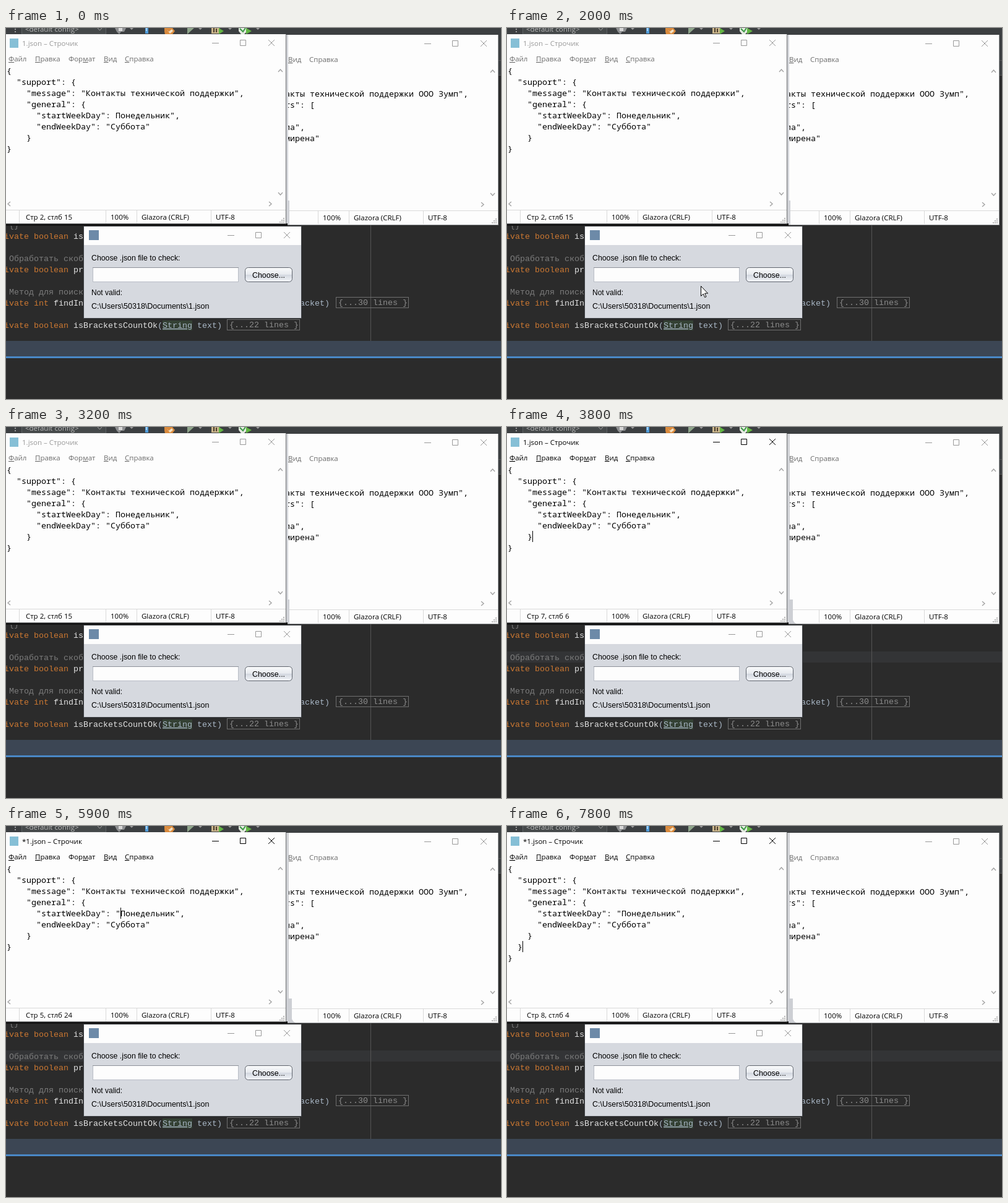
These frames come from a looping animation (800x600 px, 8 s). An HTML page:

```html
<!DOCTYPE html>
<html lang="ru">
<head>
<meta charset="utf-8">
<title>JSON check</title>
<style>
html, body { margin: 0; width: 100%; height: 100%; overflow: hidden; background: #2b2b2b; }
svg { display: block; }
text { white-space: pre; }
.ui { font: 11.5px "Open Sans", "Noto Sans", sans-serif; }
.note { font: 13.33px "Noto Sans Mono", monospace; fill: #000; }
.code { font: 13.33px "Liberation Mono", monospace; fill: #a9b7c6; }
.swing { font-family: "Liberation Sans", sans-serif; fill: #000; }
.kw { fill: #cc7832; }
.fn { fill: #e2e2e2; }
.rem { fill: #7c7c7c; }
.u { text-decoration: underline; }
.title { fill: #999; }
.menu { fill: #6d6d6d; }
.ctl { stroke: #999; fill: none; }
.active .title, .active .menu { fill: #000; }
.active .ctl { stroke: #000; }
</style>
</head>
<body>
<svg id="stage" width="800" height="600" viewBox="0 0 800 600"></svg>
<script>
const LOOP = 8000, CHAR = 8, ROW = 18;
const stage = document.getElementById('stage');

function add(parent, tag, attrs = {}, content) {
  const el = document.createElementNS('http://www.w3.org/2000/svg', tag);
  for (const k in attrs) el.setAttribute(k, attrs[k]);
  if (content !== undefined) el.textContent = content;
  return parent.appendChild(el);
}
const rect = (p, x, y, width, height, fill, more) =>
  add(p, 'rect', { x, y, width, height, fill, ...more });
const path = (p, d, stroke, more) => add(p, 'path', { d, stroke, fill: 'none', ...more });
const shape = (p, d, fill) => add(p, 'path', { d, fill });
const text = (p, cls, x, y, s, more) => add(p, 'text', { class: cls, x, y, ...more }, s);
const show = (el, on) => el.setAttribute('visibility', on ? 'visible' : 'hidden');

// Text made of [class, string] runs
function runs(p, cls, x, y, parts) {
  const t = text(p, cls, x, y, '');
  for (const [c, s] of parts) add(t, 'tspan', { class: c }, s);
}

function controls(p, x, y) {
  add(p, 'path', {
    d: `M${x - 5} ${y + .5}h11 M${x + 40.5} ${y - 4.5}h9v9h-9z M${x + 86} ${y - 5}l10 10m0 -10l-10 10`,
    class: 'ctl'
  });
}

function drawEditor() {
  rect(stage, 0, 0, 800, 600, '#2b2b2b');
  const hl = rect(stage, 0, 363, 800, 18, '#333436');
  rect(stage, 589, 319, 1, 187, '#555');

  const code = (y, ...parts) => runs(stage, 'code', -3, y, parts);
  const fold = (x, y, lines) => {
    rect(stage, x + .5, y + .5, 117, 17, 'none', { stroke: '#6f6f6f' });
    text(stage, 'code', x + 4, y + 13, `{...${lines} lines }`, { style: 'fill:#8c8c8c' });
  };
  code(323, ['rem', ' {}"']);
  code(341, ['kw', 'ivate boolean '], ['fn', 'is']);
  code(377, ['rem', ' Обработать скобки']);
  code(395, ['kw', 'ivate boolean '], ['fn', 'pr']);
  code(431, ['rem', ' Метод для поиска']);
  code(449, ['kw', 'ivate int '], ['fn', 'findIn']);
  text(stage, 'code', 475, 449, 'acket)');
  fold(533, 435, 30);
  rect(stage, 253, 473, 48, 16, '#344134');
  code(485, ['kw', 'ivate boolean '], ['fn', 'isBracketsCountOk'], ['', '('], ['u', 'String'], ['', ' text)']);
  fold(357, 471, 22);

  rect(stage, 0, 506, 800, 25, '#3c4654');
  rect(stage, 0, 531, 800, 3, '#4a88c7');
  return hl;
}

function drawToolbar() {
  rect(stage, 0, 0, 800, 12, '#3c3f41');
  rect(stage, 795, 12, 5, 65, '#3c3f41');
  rect(stage, 796, 52, 4, 1, '#555');
  rect(stage, 795, 76, 5, 1, '#555');
  rect(stage, 14, 1, 2, 2, '#999');
  rect(stage, 14, 5, 2, 2, '#999');
  rect(stage, 25.5, -8, 136, 18, '#45494a', { stroke: '#5e6264' });
  text(stage, 'ui', 31, 6, '<default config>', { fill: '#bbb' });
  path(stage, 'M148 0l3.5 4l3.5 -4', '#a0a0a0');
  shape(stage, 'M176 0h18l-3 6h-5l-3 4l-4 -4z', '#8d8f91');
  rect(stage, 182, 0, 6, 5, '#d6d6d6');
  rect(stage, 225, 0, 5, 9, '#4f9bd9');
  rect(stage, 226, 0, 2, 5, '#a9d5f5');
  shape(stage, 'M256 0h13l4 5l-4 5h-12l-1 -4z', '#d98a3d');
  shape(stage, 'M259 2l4 4l5 -4l2 3l-5 4z', '#f2e0c4');
  shape(stage, 'M293 0h11l-11 10z', '#8fa58b');
  rect(stage, 332, 0, 13, 9, '#c9b48a');
  rect(stage, 335, 0, 2, 7, '#4d4030');
  rect(stage, 339, 1, 2, 6, '#4d4030');
  shape(stage, 'M344 0l8 5l-8 5z', '#62b543');
  shape(stage, 'M376 0h13v6l-4 4h-5l-4 -5z', '#e4e9e0');
  path(stage, 'M378 1l5 5l4 -6', '#3b9a45', { 'stroke-width': 2 });
  shape(stage, 'M388 0l9 5l-9 5z', '#62b543');
  for (const x of [203, 314, 362, 407]) shape(stage, `M${x - 3} 0h6l-3 3z`, '#999');
}

// Frame parts shared by both text panes
function drawFrame(g, dx, dy) {
  const f = add(g, 'g', { transform: `translate(${dx} ${dy})` });
  controls(f, 338, 24);
  path(f, 'M440 71l3.5 -4l3.5 4 M440 266l3.5 4l3.5 -4 M425 281l4 3.5l-4 3.5', '#a0a0a0', { 'stroke-width': 1.3 });
  rect(f, 0, 294, 452, 1, '#d9d9d9');
  for (const x of [161, 211, 331]) rect(f, x, 295, 1, 21, '#d9d9d9');
  [[169, '100%'], [219, 'Glazora (CRLF)'], [339, 'UTF-8']].forEach(([x, s]) => text(f, 'ui', x, 310, s));
  for (let i = 0; i < 3; i++)
    for (let j = 0; j <= i; j++) rect(f, 448 - j * 3, 307 + i * 3, 2, 2, '#b5b5b5');
}

function drawMenu(g, dx, y, items) {
  for (const [x, a, key, b] of items)
    runs(g, 'ui menu', x + dx, y, [['', a], ['u', key], ['', b]]);
}
const VIEW = [[158, '', 'В', 'ид'], [192, '', 'С', 'правка']];

function drawBackPane() {
  const g = add(stage, 'g');
  rect(g, 452, 11, 344, 308, '#8a8c8e');
  rect(g, 452, 11, 343, 307, '#fdfdfd');
  drawMenu(g, 298, 55, [VIEW[0], [192, 'Справка', '', '']]);
  ['акты технической поддержки ООО Зумп",', 'rs": [', ',', 'ла",', 'мирена"']
    .forEach((s, i) => text(g, 'note', 451, 111 + i * ROW, s));
  drawFrame(g, 343, 1);
  rect(g, 452, 279, 6, 39, '#cfd1d6');
  rect(g, 453, 11, 3, 268, '#d3d5da');
  const shade = add(g, 'g');
  rect(shade, 453, 11, 4, 268, '#d0d2d6');
  shape(shade, 'M453 279h9v33q2 5 6 6h-15z', '#cdcfd4');
  return shade;
}

function drawFrontPane() {
  const g = add(stage, 'g');
  rect(g, 0, 316, 455, 4, '#161616');
  rect(g, 0, 10, 453, 307, '#6a6c6e');
  rect(g, 0, 10, 452, 306, '#fdfdfd');
  rect(g, 6, 17, 14, 15, '#86bfd6');
  const title = text(g, 'ui title', 26, 29, '');
  drawMenu(g, 0, 54, [[4, '', 'Ф', 'айл'], [47, '', 'П', 'равка'], [101, 'Фор', 'м', 'ат'], ...VIEW]);
  const lines = Array.from({ length: 9 }, (_, i) => text(g, 'note', 1, 74 + i * ROW, ''));
  path(g, 'M7 281l-4 3.5l4 3.5', '#a0a0a0', { 'stroke-width': 1.3 });
  drawFrame(g, 0, 0);
  rect(g, 21, 295, 1, 21, '#d9d9d9');
  const status = text(g, 'ui', 32, 310, '');
  const caret = rect(g, 0, 0, 1, ROW, '#000');
  return { g, title, lines, status, caret };
}

function drawDialog() {
  const g = add(stage, 'g');
  const grad = add(add(g, 'defs'), 'linearGradient', { id: 'btn', x2: 0, y2: 1 });
  [[0, '#fafbfc'], [.5, '#e6e9ee'], [.52, '#d3d8e0'], [1, '#f4f6fa']]
    .forEach(([offset, c]) => add(grad, 'stop', { offset, 'stop-color': c }));
  rect(g, 125, 320, 353, 150, '#3f4246');
  rect(g, 126, 321, 351, 148, '#d6d9df');
  rect(g, 126, 321, 351, 30, '#fdfdfd');
  rect(g, 134, 327, 16, 16, '#6d8aa8');
  controls(g, 363, 335);
  rect(g, 140.5, 387.5, 235, 23, '#fdfdfd', { stroke: '#b9bdc6' });
  rect(g, 140, 387, 236, 1, '#8d9199');
  rect(g, 386.5, 387.5, 76, 23, 'url(#btn)', { rx: 5, stroke: '#5f646d' });
  [[138, 376, 12.3, 'Choose .json file to check:'], [398, 404, 12.4, 'Choose...'],
   [138, 432, 12, 'Not valid:'], [138, 454, 12.5, 'C:\\Users\\50318\\Documents\\1.json']]
    .forEach(([x, y, size, s]) => text(g, 'swing', x, y, s, { 'font-size': size }));
}

const hl = drawEditor();
drawToolbar();
const shade = drawBackPane();
const front = drawFrontPane();
drawDialog();
const beam = path(stage, 'M-3 -8h7M.5 -8v16M-3 8h7', '#fdfdfd');
const arrow = add(stage, 'path', {
  d: 'M.5 .5v16l3.7 -3.5l2.5 5.6l2.3 -1l-2.4 -5.5h5z', fill: '#fff', stroke: '#000'
});

// Edit position: time, row, column, caret visible
const edits = [
  [0, 2, 15, 0], [3800, 7, 6, 1], [4300, 7, 6, 0], [4800, 5, 23, 1], [5400, 5, 23, 0],
  [5900, 5, 24, 1], [6400, 5, 24, 0], [6600, 7, 6, 1], [7100, 8, 1, 1],
  [7500, 8, 2, 1], [7700, 8, 3, 1], [7800, 8, 4, 1]
];
// Pointer paths: time, x, y; hidden outside their span
const arrowPath = [[1900, 341, 401], [2100, 285, 432], [2400, 205, 454], [2600, 177, 448], [2700, 177, 448],
  [2800, 168, 432], [3100, 117, 305]];
const beamPath = [[4600, 180, 148], [4700, 180, 148], [5000, 203, 150], [5300, 203, 150],
  [5500, 209, 157], [6000, 209, 157], [6100, 202, 160]];

function follow(el, keys, t) {
  const i = keys.findIndex(k => k[0] >= t);
  const on = i >= 0 && t >= keys[0][0];
  show(el, on);
  if (!on) return;
  const b = keys[i], a = keys[Math.max(i - 1, 0)];
  const f = b === a ? 0 : (t - a[0]) / (b[0] - a[0]);
  const at = n => Math.round(a[n] + (b[n] - a[n]) * f);
  el.setAttribute('transform', `translate(${at(1)} ${at(2)})`);
}

function setText(el, s) {
  if (el.textContent !== s) el.textContent = s;
}

function content(t, col) {
  const quote = t >= 5900 ? '"' : '';
  const lines = ['{', '  "support": {', '    "message": "Контакты технической поддержки",',
    '    "general": {', `      "startWeekDay": ${quote}Понедельник",`, '      "endWeekDay": "Суббота"', '    }'];
  if (t >= 7100) lines.push('  }'.slice(0, col - 1));
  return [...lines, '}'];
}

function render(now) {
  const t = Math.floor(now % LOOP / 100) * 100;
  const [, row, col, on] = edits.filter(e => e[0] <= t).pop();
  const active = t >= 3800;
  front.g.setAttribute('class', active ? 'active' : '');
  show(hl, active);
  show(shade, active);
  setText(front.title, (t >= 5900 ? '*' : '') + '1.json – Строчик');
  setText(front.status, `Стр ${row}, стлб ${col}`);
  const doc = content(t, col);
  front.lines.forEach((el, i) => setText(el, doc[i] || ''));
  front.caret.setAttribute('x', 1 + (col - 1) * CHAR);
  front.caret.setAttribute('y', 60 + (row - 1) * ROW);
  show(front.caret, on);
  follow(arrow, arrowPath, t);
  follow(beam, beamPath, t);
}

const start = performance.now();
function tick() {
  render(performance.now() - start);
  requestAnimationFrame(tick);
}
tick();
</script>
</body>
</html>
```
